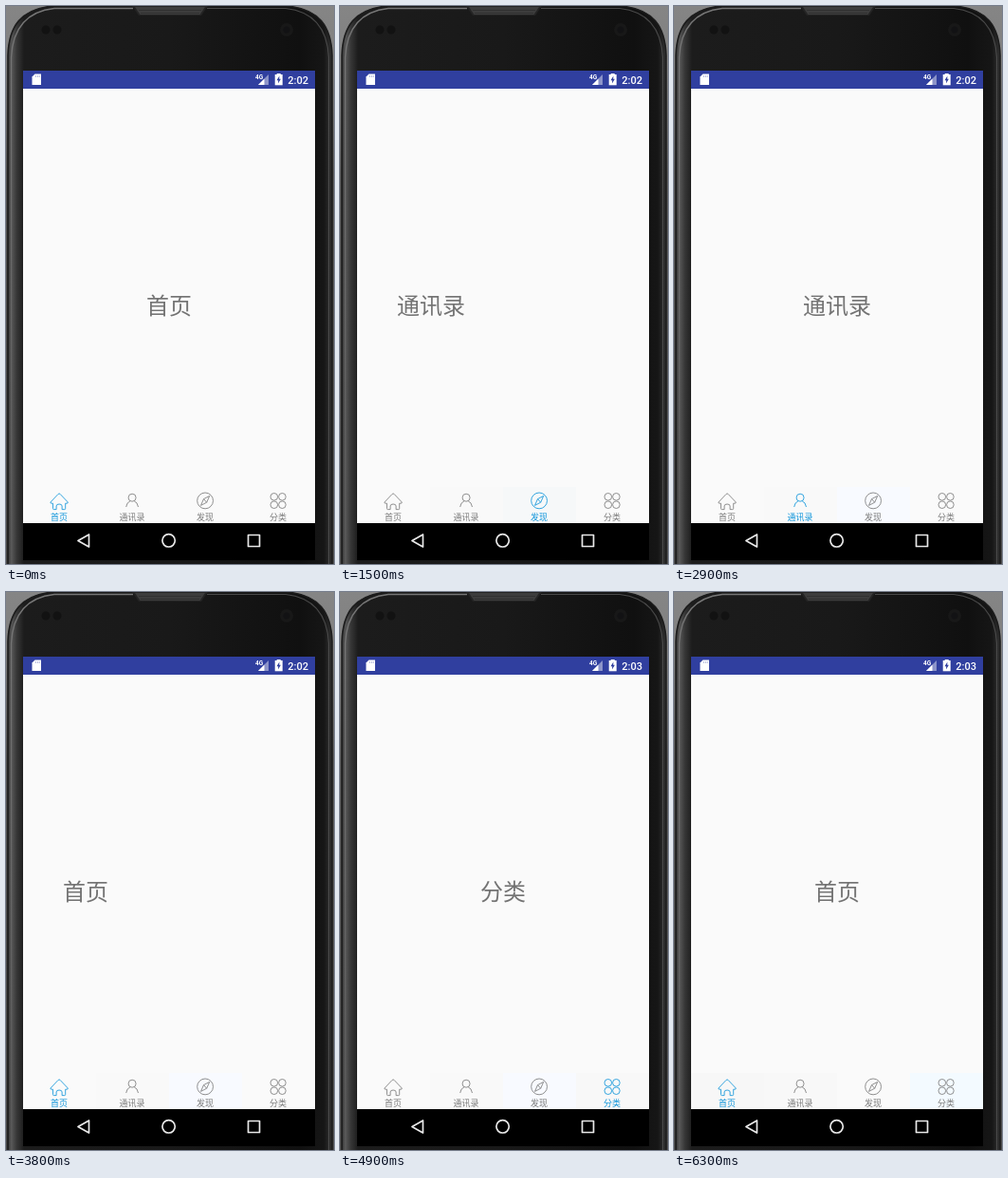
An HTML page with a canvas for the animation above (7.2 s loop, 346x587 px).

```html
<!DOCTYPE html>
<html lang="zh">
<head>
<meta charset="utf-8">
<title>Tab pager</title>
<style>
html, body { margin: 0; width: 100%; height: 100%; overflow: hidden; background: #858585; }
canvas { display: block; width: 346px; height: 587px; }
</style>
</head>
<body>
<canvas id="stage" width="346" height="587"></canvas>
<script>
const ctx = document.getElementById('stage').getContext('2d');
const LOOP = 7200, TICK = 100;
const LEFT = 18, PAGE = 308, TAB = 77, MID = 172;
const CJK = '"Noto Sans CJK SC", "Noto Sans CJK", "Noto Sans CJK JP", sans-serif';
const GREY = '#7c7c7c', BLUE = '#1296db';
const pages = ['首页', '通讯录', '发现', '分类'];

// Settling scrolls: start, from, target page, duration
const settles = [
  [954, 0, 1, 200],
  [1489, PAGE, 2, 200],
  [2740, 404, 1, 200],
  [3760, 124, 0, 600],
  [4565, 0, 3, 400],
  [5073, 3 * PAGE, 2, 200],
  [5600, 2 * PAGE, 1, 170],
  [6066, PAGE, 0, 200]
];

// Finger drags: first tick, page, shift at each tick, end
const drags = [
  [2300, 2, [40, 85, 128, 212], 2740],
  [3600, 1, [70, 175], 3760]
];

// Tab backgrounds left by touches: start, tab, colour
const tints = [
  [1000, 1, '#f9f9f9'],
  [1500, 2, '#f6f8f9'],
  [1900, 2, '#f8faff'],
  [4600, 3, '#f8f8f8'],
  [5100, 2, '#fafafa'],
  [5100, 3, '#f3faff'],
  [5500, 1, '#f4f4f4'],
  [5600, 1, '#f0f0f0'],
  [5900, 1, '#f8f8f8'],
  [6100, 0, '#f7f7f7']
];

function pagerAt(t) {
  let scroll = 0, tab = 0;
  for (const [start, from, page, dur] of settles) {
    if (t < start) break;
    const left = Math.max(0, 1 - (t - start) / dur);
    const target = page * PAGE;
    scroll = target + (from - target) * left ** 5;
    tab = page;
  }
  for (const [start, page, shifts, end] of drags) {
    if (t < start || t >= end) continue;
    const i = Math.min(shifts.length - 1, Math.floor((t - start) / TICK));
    scroll = page * PAGE - shifts[i];
  }
  return { scroll: Math.round(scroll), tab };
}

function rect(x, y, w, h, fill) {
  ctx.fillStyle = fill;
  ctx.fillRect(x, y, w, h);
}

function poly(points, fill) {
  ctx.fillStyle = fill;
  ctx.beginPath();
  points.forEach(([x, y]) => ctx.lineTo(x, y));
  ctx.closePath();
  ctx.fill();
}

function dot(x, y, r, fill) {
  ctx.fillStyle = fill;
  ctx.beginPath();
  ctx.arc(x, y, r, 0, 7);
  ctx.fill();
}

function line(path, colour, width) {
  ctx.strokeStyle = colour;
  ctx.lineWidth = width;
  ctx.stroke(new Path2D(path));
}

function text(str, x, y, font, fill, align = 'center') {
  ctx.font = font;
  ctx.fillStyle = fill;
  ctx.textAlign = align;
  ctx.fillText(str, x, y);
}

function fade(x0, y0, x1, y1, colours) {
  const g = ctx.createLinearGradient(x0, y0, x1, y1);
  colours.forEach(([at, colour]) => g.addColorStop(at, colour));
  return g;
}

function drawPhone() {
  rect(0, 0, 346, 587, fade(0, 0, 0, 587, [[0, '#858585'], [0.1, '#808080'], [0.3, '#585858'], [1, '#4c4c4c']]));

  const shell = 'M2 590V52C3 22 15 3 50 0H296C331 3 343 22 344 52V590';
  ctx.fillStyle = fade(2, 0, 344, 0, [
    [0, '#3c3c3c'], [0.012, '#565656'], [0.028, '#363636'], [0.05, '#1c1c1c'],
    [0.5, '#191919'], [0.9, '#101010'], [0.975, '#161616'], [1, '#343434']
  ]);
  ctx.fill(new Path2D(shell));
  line(shell, '#1c1c1c', 1.6);
  line('M5.5 590V54C7 26 19 6 51 2.5H134', fade(0, 0, 0, 587, [[0, '#777'], [1, '#585858']]), 1.3);
  line('M212 2.5H295C327 6 339 26 340.5 54V590', '#4a4a4a', 1.1);

  poly([[133, 0], [213, 0], [206, 10], [140, 10]], '#242424');
  poly([[136, 1], [210, 1], [204.5, 9], [141.5, 9]], '#3d3d3d');
  line('M140 4.5H206M142 7.5H204', '#303030', 1);

  dot(42, 25, 4.5, '#121212');
  dot(54, 25, 4.5, '#121212');
  dot(296, 25, 7, '#181818');
  dot(296, 25, 3.5, '#121214');
}

function drawStatus(t) {
  rect(LEFT, 68, PAGE, 19, '#303f9f');
  poly([[30.5, 71.5], [37, 71.5], [37, 83], [27.5, 83], [27.5, 74.5]], '#fff');
  line('M31.5 73V75M33.5 73V75M35.3 73V75', '#8c94c9', 0.6);

  poly([[277, 72], [277, 83], [266, 83]], '#8c94c9');
  poly([[272.5, 76.5], [272.5, 83], [266, 83]], '#fff');
  text('4G', 263, 77, 'bold 6.5px Roboto, sans-serif', '#fff', 'left');

  rect(285.7, 71, 4, 2, '#fff');
  rect(283.7, 72, 8, 11.3, '#fff');
  poly([[288.4, 73.5], [285.5, 78.2], [287.2, 78.2], [287, 81.5], [289.9, 76.8], [288.2, 76.8]], '#303f9f');

  text(t < 4800 ? '2:02' : '2:03', 319, 82, '500 11px Roboto, sans-serif', '#fff', 'right');
}

// Icons are drawn around their own centre
const icons = [
  'M-9.2 1.6L-1 -7Q0 -8 1 -7L9.2 1.6Q9.4 2.8 8 2.8H6.6V8.2Q6.6 9.2 5.6 9.2H3V5.6Q3 3.6 0 3.6T-3 5.6V9.2H-5.6Q-6.6 9.2 -6.6 8.2V2.8H-8Q-9.4 2.8 -9.2 1.6Z',
  'M-4 -3.2a4 4 0 1 1 8 0a4 4 0 1 1 -8 0M-6.4 6.6Q-5.6 1.6 -2.2 .5M2.2 .5Q5.6 1.6 6.4 6.6',
  'M-8.4 0a8.4 8.4 0 1 1 16.8 0a8.4 8.4 0 1 1 -16.8 0M4.6 -5L1.6 1.8L-4.6 5L-1.6 -1.8ZM-1.6 -1.8L1.6 1.8',
  [[-4.3, -4.1], [4.3, -4.1], [-4.3, 4.3], [4.3, 4.3]].map(([x, y]) =>
    `M${x - 3.8} ${y}a3.8 3.8 0 1 1 7.6 0a3.8 3.8 0 1 1 -7.6 0`).join('')
];

function drawTabs(t, selected) {
  for (const [start, tab, colour] of tints) {
    if (t >= start) rect(LEFT + tab * TAB, 506, TAB, 38, colour);
  }
  pages.forEach((name, i) => {
    const x = LEFT + TAB * (i + 0.5) - 0.4;
    const colour = i === selected ? BLUE : GREY;
    ctx.save();
    ctx.translate(x, 520.4);
    line(icons[i], colour, 0.85);
    ctx.restore();
    text(name, x, 541, '9px ' + CJK, colour);
  });
}

function drawNav() {
  rect(LEFT, 544, PAGE, 39, '#000');
  line('M87.5 556V569L76 562.5ZM178.3 562.3a6.7 6.7 0 1 0 -13.4 0a6.7 6.7 0 1 0 13.4 0M255.5 556.5H267.5V568.5H255.5Z', '#e8e8e8', 1.7);
}

function draw(t) {
  const { scroll, tab } = pagerAt(t);
  drawPhone();
  rect(LEFT, 68, PAGE, 476, '#fafafa');
  drawStatus(t);
  ctx.save();
  ctx.beginPath();
  ctx.rect(LEFT, 87, PAGE, 419);
  ctx.clip();
  pages.forEach((name, i) => text(name, MID + i * PAGE - scroll, 324, '24px ' + CJK, '#737373'));
  ctx.restore();
  drawTabs(t, tab);
  drawNav();
}

const begin = performance.now();
function frame() {
  const t = (performance.now() - begin) % LOOP;
  draw(Math.floor(t / TICK) * TICK);
  requestAnimationFrame(frame);
}
ctx.lineJoin = 'round';
frame();
</script>
</body>
</html>
```
